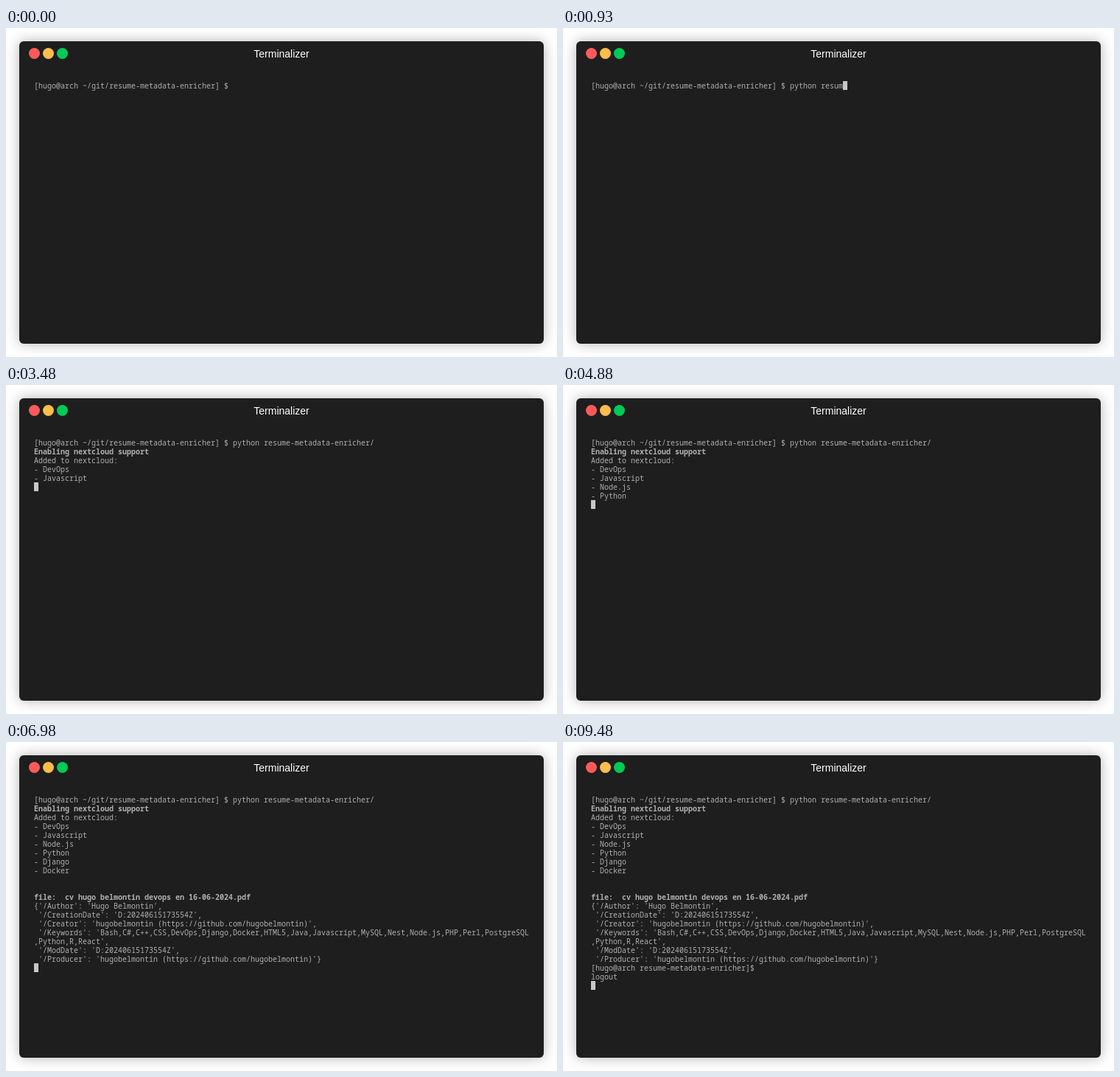
Write an HTML page that moves like this. It is 748 px wide and 446 px high and loops after 9580 ms.

```html
<!DOCTYPE html>
<html lang="en">
<head>
<meta charset="utf-8">
<title>Terminal</title>
<style>
  html, body { margin: 0; width: 100%; height: 100%; overflow: hidden; background: #fff; }
  #window {
    position: absolute; left: 18px; top: 18px; width: 712px; height: 410px;
    border-radius: 6px; background: #1e1e1e; box-shadow: 0 0 18px rgba(0, 0, 0, .3);
  }
  .dot { position: absolute; top: 9px; width: 15px; height: 15px; border-radius: 50%; }
  #title {
    position: absolute; top: 9px; width: 100%; text-align: center; color: #fff;
    font: 14px/16px "Liberation Sans", Arial, sans-serif;
  }
  #screen {
    position: absolute; left: 20px; top: 54px; margin: 0; color: #afafaf;
    font: 10px/12px "Noto Sans Mono", "DejaVu Sans Mono", monospace;
  }
  #screen b { font-weight: 700; }
  #cursor { position: absolute; width: 6px; height: 12px; background: #c7c7c7; }
</style>
</head>
<body>
<div id="window">
  <i class="dot" style="left:13px;background:#ff5a5a"></i>
  <i class="dot" style="left:32px;background:#ffbd4d"></i>
  <i class="dot" style="left:51px;background:#00ca56"></i>
  <div id="title">Terminalizer</div>
  <pre id="screen"></pre>
  <div id="cursor"></div>
</div>
<script>
const LOOP = 9580;
const screenEl = document.getElementById("screen");
const cursorEl = document.getElementById("cursor");

// Each event appends text to the terminal at its time.
const events = [[0, "[hugo@arch ~/git/resume-metadata-enricher] $ "]];
[..."python "].forEach((c, i) => events.push([300 + (i + 1) * 300 / 7, c]));
[..."resume"].forEach((c, i) => events.push([680 + i * 60, c]));
events.push(
  [1280, "-metadata-enricher/"],
  [1780, "\n"],
  [2280, "<b>Enabling nextcloud support</b>\n"],
  [2780, "Added to nextcloud:\n- DevOps\n"]
);
["Javascript", "Node.js", "Python", "Django", "Docker"].forEach(
  (skill, i) => events.push([3480 + i * 700, `- ${skill}\n`])
);
events.push(
  [6980, `

<b>file:  cv hugo belmontin devops en 16-06-2024.pdf</b>
{'/Author': 'Hugo Belmontin',
 '/CreationDate': 'D:20240615173554Z',
 '/Creator': 'hugobelmontin (https://github.com/hugobelmontin)',
 '/Keywords': 'Bash,C#,C++,CSS,DevOps,Django,Docker,HTML5,Java,Javascript,MySQL,Nest,Node.js,PHP,Perl,PostgreSQL
,Python,R,React',
 '/ModDate': 'D:20240615173554Z',
 '/Producer': 'hugobelmontin (https://github.com/hugobelmontin)'}
`],
  [7480, "[hugo@arch resume-metadata-enricher]$ "],
  [9480, "\nlogout\n"]
);

let shown;
function draw(now) {
  const t = now % LOOP;
  const text = events.filter(([at]) => at <= t + .01).map(e => e[1]).join("");
  if (text !== shown) {
    screenEl.innerHTML = shown = text;
    const lines = text.replace(/<\/?b>/g, "").split("\n");
    cursorEl.style.left = 20 + lines.at(-1).length * 6 + "px";
    cursorEl.style.top = 54 + (lines.length - 1) * 12 + "px";
  }
  cursorEl.hidden = t < 300;
  requestAnimationFrame(() => draw(performance.now()));
}
draw(0);
</script>
</body>
</html>
```
